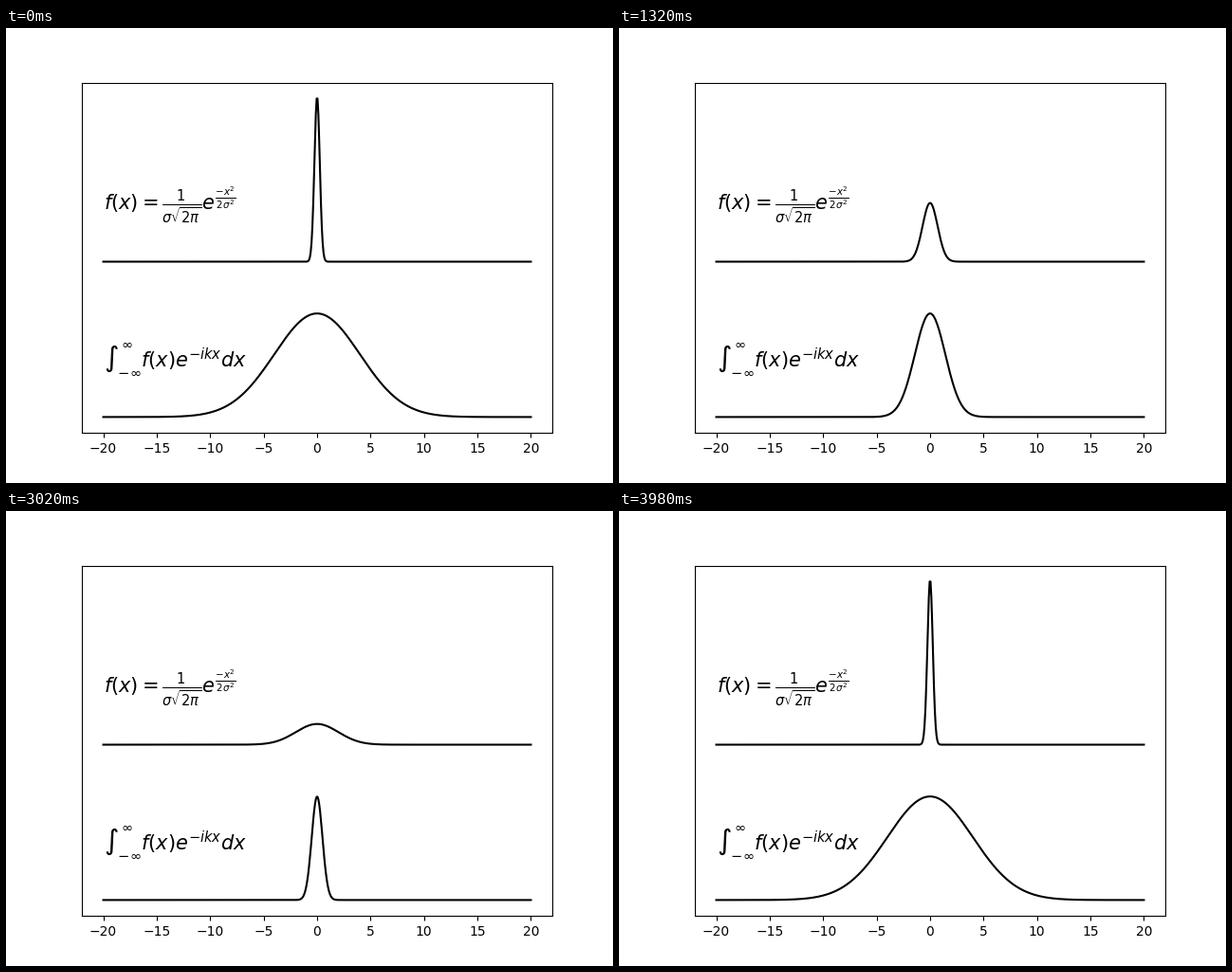
A matplotlib script for the animation above (5 s loop, 640 by 480 pixels).

```python
import numpy as np
import matplotlib.pyplot as plt
from matplotlib.animation import FuncAnimation

STEP = 50                # frames per phase: hold, widen, hold, narrow, hold
NARROW, WIDE = 0.25, 2.0
OFFSET = 1.5             # height of the upper curve's baseline

x = np.linspace(-20, 20, 500)


def sigma_at(frame):
    """Width of the upper gaussian, with a cosine ease between the holds."""
    widen = (frame - STEP + 1) / STEP
    narrow = (4 * STEP - 1 - frame) / STEP
    u = np.clip(min(widen, narrow), 0, 1)
    return NARROW + (WIDE - NARROW) * (1 - np.cos(np.pi * u)) / 2


def gaussian(sigma):
    return np.exp(-x**2 / (2 * sigma**2)) / (sigma * np.sqrt(2 * np.pi))


def transform(sigma):
    return np.exp(-(sigma * x)**2 / 2)


fig, ax = plt.subplots(figsize=(6.4, 4.8), dpi=100)
upper, = ax.plot(x, gaussian(NARROW) + OFFSET, "k", lw=1.5)
lower, = ax.plot(x, transform(NARROW), "k", lw=1.5)
ax.set_xlim(ax.get_xlim())
ax.set_ylim(ax.get_ylim())
ax.set_yticks([])

ax.text(-20, OFFSET + 0.5,
        r"$f(x) = \frac{1}{\sigma\sqrt{2\pi}}e^{\frac{-x^2}{2\sigma^2}}$",
        fontsize=15)
ax.text(-20, 0.5, r"$\int_{-\infty}^{\infty}f(x)e^{-ikx}dx$", fontsize=15)


def update(frame):
    sigma = sigma_at(frame)
    upper.set_ydata(gaussian(sigma) + OFFSET)
    lower.set_ydata(transform(sigma))
    return upper, lower


anim = FuncAnimation(fig, update, frames=5 * STEP, interval=20,
                     repeat=True, repeat_delay=0, blit=False)
plt.show()
```
